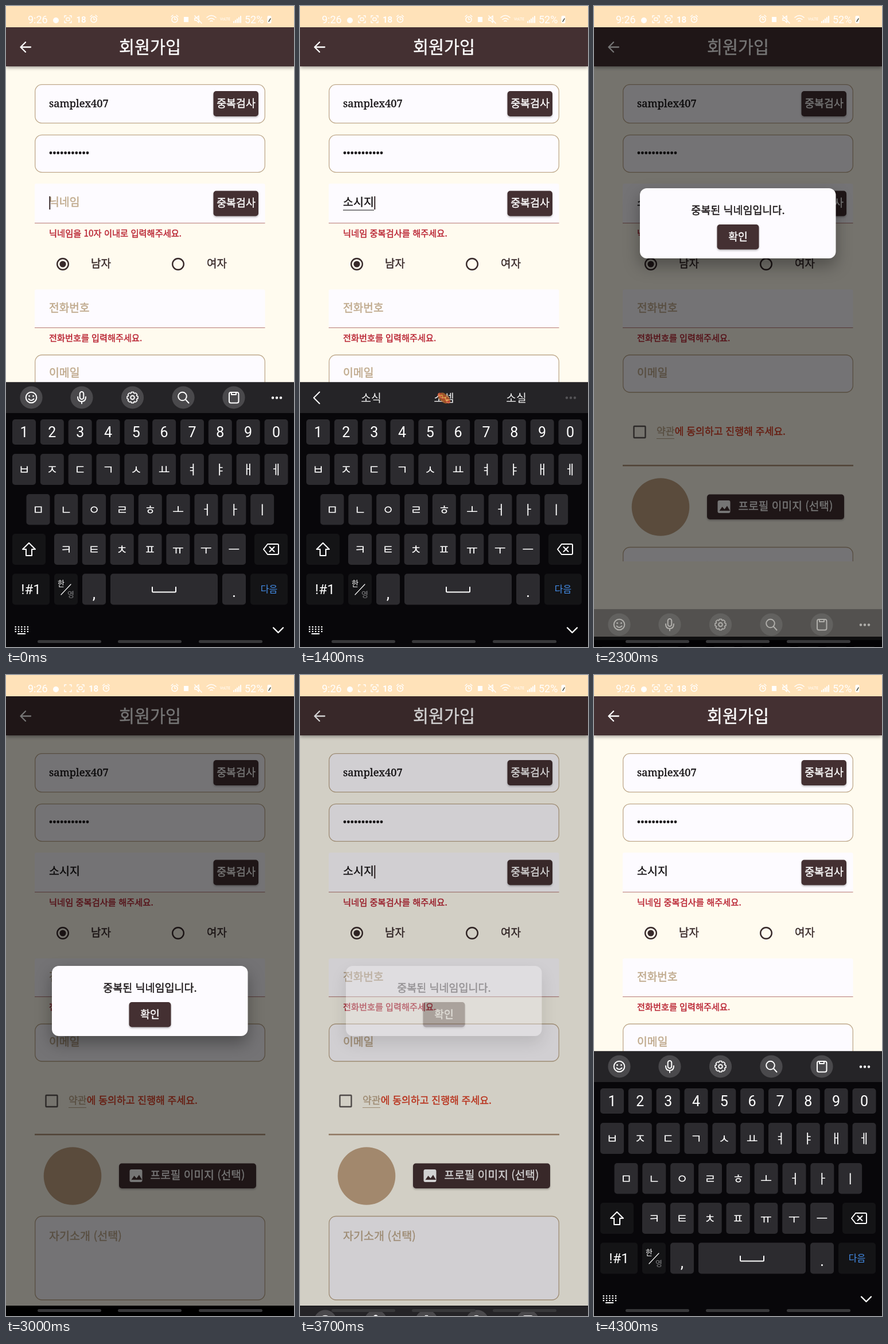
These frames come from a looping animation (502x1115 px, 4600 ms). An HTML page:

```html
<!DOCTYPE html>
<html lang="ko">
<head>
<meta charset="utf-8">
<style>
  html, body { margin: 0; width: 100%; height: 100%; overflow: hidden; background: #000; }
  svg { display: block; width: 502px; height: 1115px; }
  text { font-family: "Noto Sans CJK KR", "Noto Sans CJK", sans-serif; fill: currentColor; white-space: pre; }
  tspan { fill: currentColor; }
  .latin { font-family: Roboto, "Noto Sans CJK KR", sans-serif; }
  .slab { font-family: "Noto Serif", serif; }
  .inked text, .inked tspan { stroke: currentColor; stroke-width: .4; }
  .raised { filter: drop-shadow(0 2px 1.5px rgba(0, 0, 0, .25)); }
  .line { fill: none; stroke: #fff; stroke-width: 2; stroke-linecap: round; stroke-linejoin: round; }
  #dialog { filter: drop-shadow(0 13px 14px rgba(0, 0, 0, .32)); }
</style>
</head>
<body>
<svg id="stage" viewBox="0 0 502 1115"></svg>
<script>
const LOOP = 4600, STEP = 100;
const BROWN = '#443032', INK = '#382a2b', TAN = '#bfa98b', PAPER = '#fdfbff', RED = '#b92231';
const NICK = ['', 'ㅅ', '소', '솟', '소시', '소싲', '소시지'];
const KEY_TIMES = [200, 400, 600, 800, 1000, 1300];
const KEY_NAMES = ['ㅅ', 'ㅗ', 'ㅅ', 'ㅣ', 'ㅈ', 'ㅣ'];

// ---------- drawing helpers ----------
const text = (x, cy, str, size, color, extra = '') =>
  `<text x="${x}" y="${cy + size * .37}" font-size="${size}" color="${color}" ${extra}>${str}</text>`;
const centred = (x, cy, str, size, color, extra = '') =>
  text(x, cy, str, size, color, 'text-anchor="middle" ' + extra);
const rect = (x, y, w, h, fill, r = 0, extra = '') =>
  `<rect x="${x}" y="${y}" width="${w}" height="${h}" rx="${r}" fill="${fill}" ${extra}/>`;
const circle = (x, y, r, fill, extra = '') => `<circle cx="${x}" cy="${y}" r="${r}" fill="${fill}" ${extra}/>`;
const line = (d, style = '') => `<path class="line" d="${d}" style="${style}"/>`;
const repeat = (n, draw) => Array.from({ length: n }, (_, i) => draw(i)).join('');
const group = (id, body, extra = '') => `<g id="${id}" ${extra}>${body}</g>`;

const outlined = (y, h) => rect(50.7, y, 400.6, h, PAPER, 12, `stroke="${TAN}" stroke-width="1.3"`);
const underlined = (y, h) => rect(50, y, 401.5, h, PAPER, 3) + rect(50, y + h - .5, 401.5, 1.2, '#c08a87');
const button = (x, y, w, h) => rect(x, y, w, h, BROWN, 5, 'class="raised"');
const checkButton = y => button(361.5, y, 78.5, 44);
const checkLabel = y => centred(401, y + 21, '중복검사', 18.4, '#fff');
const radio = x => circle(x, 449, 9.8, 'none', `stroke="${INK}" stroke-width="2.4"`);

// ---------- screen parts ----------
function form() {
  return outlined(136.7, 67) + text(75, 169, 'samplex407', 18.3, '#151214', 'class="slab"') +
    checkButton(148) + checkLabel(148) +
    outlined(224.3, 65) + repeat(11, i => circle(78 + i * 6.4, 255.5, 2.4, '#151214')) +
    underlined(309, 68.5) + text(75, 341, '닉네임', 19.4, TAN, 'id="nickHint"') +
    text(75, 341, '', 19.5, '#151214', 'id="nick"') +
    rect(75, 354.5, 54, 1.1, '#222', 0, 'id="composing"') + rect(75, 331, 2, 23, INK, 0, 'id="cursor"') +
    checkButton(321.5) +
    `<g clip-path="url(#checkClip)">${circle(401, 343, 1, '#fff', 'id="ripple"')}</g>` + checkLabel(321.5) +
    text(75, 395, '', 15.3, RED, 'id="error"') +
    radio(99) + circle(99, 449, 5.6, INK) + text(148, 448, '남자', 19, INK) +
    radio(300) + text(350, 448, '여자', 19, INK) +
    underlined(493, 66.5) + text(75, 524.5, '전화번호', 19.2, TAN) +
    text(75, 577, '전화번호를 입력해주세요.', 15.2, RED) +
    outlined(607, 65) + text(75, 638, '이메일', 19.4, TAN) +
    rect(69.5, 731, 20, 20, 'none', 1, 'stroke="#605a58" stroke-width="2.4"') +
    text(109, 740, `<tspan color="${TAN}">약관</tspan>에 동의하고 진행해 주세요.`, 17.2, '#df3b20') +
    rect(109, 752, 31, 1, TAN) + rect(50, 798, 402, 2.6, '#b1957a') +
    circle(116, 871.5, 50.3, '#c4a584') + button(197, 849.5, 239, 43.5) +
    rect(215.5, 860, 22, 22, '#fff', 3) + `<path d="M218.5 878l5-7 4 4.5 4.5-6 5 8.500z" fill="${BROWN}"/>` +
    text(251.5, 870, '프로필 이미지 (선택)', 19.2, '#fff') +
    outlined(941.5, 145.5) + text(75, 976, '자기소개 (선택)', 19.6, TAN);
}

function statusBar() {
  const alarm = x => circle(x, 23.5, 5, 'none', 'stroke="#fff" stroke-width="1.5"') +
    line(`M${x} 20.500v3h2M${x - 6} 18.500l3-2.500M${x + 6} 18.500l-3-2.500`, 'stroke-width:1.3');
  const frame = (x, id) => group(id,
    line(`M${x - 6} 20v-3h3M${x + 3} 17h3v3M${x + 6} 26v3h-3M${x - 3} 29h-3v-3`, 'stroke-width:1.4') +
    rect(x - 3, 20.5, 6, 5, 'none', 1.5, 'stroke="#fff" stroke-width="1.4" class="lens"'));
  return rect(0, 0, 502, 37, '#ffe2b9') +
    text(38, 23, '9:26', 18, '#fff', 'class="latin"') + circle(87, 25, 5, '#fff') +
    frame(108, 'frameA') + frame(130, 'frameB') +
    group('notices', centred(131, 23, '18', 15, '#fff', 'class="latin" font-weight="700"') + alarm(153)) +
    alarm(294) + rect(310, 19, 8, 9, '#fff') +
    line('M329 21h3l4-4v12l-4-4h-3zM329 17l12 13', 'stroke-width:1.5') +
    line('M350 20q8-7 16 0M353 23.500q5-4 10 0M356 26.500q2-1.500 4 0', 'stroke-width:1.6') +
    text(373, 23, 'VoLTE', 6.5, '#fff', 'class="latin"') +
    repeat(5, i => rect(396 + i * 3, 26.5 - i * 2.3, 2, 3 + i * 2.3, '#fff')) +
    text(416, 23, '52%', 18, '#fff', 'class="latin"') +
    rect(455.5, 17, 7, 13, '#fff', 2) + line('M458 27l3-5', 'stroke:#554;stroke-width:1.5');
}

const appBar = () => rect(0, 37, 502, 68, BROWN, 0, 'style="filter:drop-shadow(0 2px 3px rgba(0,0,0,.4))"') +
  line('M43 71.500H26M34 63l-8.500 8.500 8.500 8.500', 'stroke-width:2.3') +
  centred(251, 71, '회원가입', 29.3, '#fff');

// The dialog is drawn around y = 0 and moved as a whole.
const dialog = () => rect(80, -61, 341.5, 122, PAPER, 12) +
  centred(251, -22.5, '중복된 닉네임입니다.', 18.5, '#1c1718') + button(214.5, 2, 73, 43.5) +
  rect(214.5, 2, 73, 43.5, '#fff', 5, 'id="confirmPress"') +
  centred(251, 23, '확인', 18.2, '#fff');

const dots = fill => [465, 472, 479].map(x => circle(x, 681.5, 2.2, fill)).join('');

function tools() {
  const gear = repeat(8, i => {
    const a = i * Math.PI / 4, at = (r, d) => `${220.5 + r * Math.cos(a + d)} ${681 + r * Math.sin(a + d)}`;
    return `${i ? 'L' : 'M'}${at(9.6, -.2)}L${at(9.6, .2)}L${at(7.6, .38)}`;
  }) + 'Z';
  return [44, 132, 220.5, 309, 397].map(x => circle(x, 681, 19.6, '#4a494c')).join('') +
    circle(44, 681, 9.3, 'none', 'class="line"') + circle(40.5, 678.5, 1.4, '#fff') + circle(47.5, 678.5, 1.4, '#fff') +
    line('M39.500 683.500q4.500 5 9 0') +
    rect(128.7, 671, 6.6, 13, 'none', 3.3, 'class="line"') + line('M125 680q0 8 7 8t7-8M132 688v3.500') +
    line(gear, 'stroke-width:1.7') + circle(220.5, 681, 3.3, 'none', 'class="line"') +
    circle(307.5, 679, 7.3, 'none', 'class="line"') + line('M313 684.500l5.500 6') +
    rect(389, 672, 16.5, 18.5, 'none', 3, 'class="line"') + line('M393 672v4h8v-4') + dots('#fff');
}

const words = list => list.map((w, i) => centred([124, 251, 377][i], 681.5, w, 19.3, '#f4f4f4')).join('');
const sausage = () => `<g transform="translate(251 682) rotate(38)">${
  rect(-11, -7, 22, 14, '#b4662c', 7)}${rect(-13, -3.5, 26, 7, '#d8532f', 3.5)}${
  line('M-9 1l3.500-3 3.500 3 3.500-3 3.500 3 3.500-3', 'stroke:#f4c04a;stroke-width:1.6')}</g>`;

function key(x, y, w, h, label, { dark, size = 22, color = '#fff', cls = '' } = {}) {
  return rect(x, y, w, h, dark ? '#141416' : '#2c2b2f', 5, `data-key="${label}"`) +
    centred(x + w / 2, y + h / 2, label, size, color, `class="${cls}"`);
}
const keyRow = (x, y, h, labels, opts) => [...labels].map((c, i) => key(x + i * 48.83, y, 41, h, c, opts)).join('');

function keyboard() {
  return rect(0, 654.5, 502, 461, '#08070a') + rect(0, 654.5, 502, 53.5, '#252427') +
    group('tools', tools()) +
    group('suggestBar', line('M34 671.500l-10 10 10 10') + dots('#555457') +
      group('earlyWords', words(['소개', '소식', '소문'])) + group('lateWords', words(['소식', '소셈', '소실'])) +
      group('finalWord', words(['소시지'])) + group('emoji', sausage())) +
    keyRow(11, 719, 44, '1234567890', { size: 25, cls: 'latin' }) +
    keyRow(11, 779, 54, 'ㅂㅈㄷㄱㅅㅛㅕㅑㅐㅔ') + keyRow(35.5, 849, 53.5, 'ㅁㄴㅇㄹㅎㅗㅓㅏㅣ') +
    keyRow(84, 918, 54, 'ㅋㅌㅊㅍㅠㅜㅡ') +
    key(11, 918, 58, 54, '', { dark: true }) + line('M40 934l-11 11h6v11h10v-11h6z') +
    key(433, 918, 58, 54, '', { dark: true }) +
    line('M456 936h17q2 0 2 2v14q0 2-2 2h-17l-7-9zM459.500 941l8 8M467.500 941l-8 8') +
    key(11, 987.5, 65, 54, '!#1', { dark: true, size: 24, cls: 'latin' }) +
    key(84, 987.5, 41, 54, '', { dark: true }) + centred(96, 1004, '한', 13, '#fff') +
    centred(113, 1023, '영', 13, '#858587') + line('M96 1024l17-18', 'stroke-width:1.2') +
    key(133, 987.5, 41, 54, '') + centred(153.5, 1021, ',', 27, '#fff', 'class="latin"') +
    key(182, 987.5, 187, 54, '') + line('M255 1011v7q0 1.500 1.500 1.500h38q1.500 0 1.500-1.500v-7') +
    key(377, 987.5, 41, 54, '') + centred(397.5, 1018, '.', 27, '#fff', 'class="latin"') +
    key(426, 987.5, 65, 54, '다음', { dark: true, size: 16, color: '#4590ee' }) +
    repeat(15, i => rect(15.5 + i % 5 * 5.3, 1079 + Math.floor(i / 5) * 4, 2.4, 2.2, '#fff')) +
    rect(20, 1091, 14, 2, '#fff') + line('M466 1081.500l8.500 8.500 8.500-8.500', 'stroke-width:2.4');
}

const stage = document.getElementById('stage');
stage.innerHTML = `<defs><clipPath id="bodyClip"><rect id="bodyArea" x="0" y="37" width="502"/></clipPath>
  <clipPath id="checkClip">${rect(361.5, 321.5, 78.5, 44, '#000', 5)}</clipPath></defs>` +
  rect(0, 0, 502, 1097, '#fffbef') + group('form', form(), 'class="inked" clip-path="url(#bodyClip)"') +
  group('appBar', appBar(), 'class="inked"') + rect(0, 37, 502, 1060, '#000', 0, 'id="barrier"') +
  group('dialog', dialog(), 'class="inked"') + statusBar() +
  rect(0, 1097, 502, 18, '#000') + group('keyboard', keyboard()) +
  [55, 195, 336].map(x => rect(x, 1103, 111, 5, '#38383a', 2.5)).join('');

// ---------- animation ----------
const el = id => document.getElementById(id);
const set = (id, attrs) => { for (const name in attrs) el(id).setAttribute(name, attrs[name]); };
const show = (id, opacity) => set(id, { opacity: +opacity });
const between = (t, from, to) => t >= from && t < to;

// Linear interpolation through [time, value] stops.
function track(t, ...stops) {
  const next = stops.findIndex(s => s[0] > t);
  if (next === 0) return stops[0][1];
  if (next < 0) return stops[stops.length - 1][1];
  const [t0, v0] = stops[next - 1], [t1, v1] = stops[next];
  return v0 + (v1 - v0) * (t - t0) / (t1 - t0);
}

function drawTyping(t) {
  const typed = KEY_TIMES.filter(k => t >= k).length;
  const value = NICK[typed];
  el('nick').textContent = value;
  el('error').textContent = typed ? '닉네임 중복검사를 해주세요.' : '닉네임을 10자 이내로 입력해주세요.';
  show('nickHint', !typed);
  show('composing', typed && t < 2200);
  set('composing', { width: value.length * 18 });
  set('cursor', { x: 75.3 + value.length * 18 });
  show('cursor', t < 1900 || between(t, 3700, 4300));

  const pressed = KEY_NAMES[KEY_TIMES.indexOf(t)];
  document.querySelectorAll('[data-key]').forEach(k => {
    if (KEY_NAMES.includes(k.dataset.key))
      k.setAttribute('fill', k.dataset.key === pressed ? '#55545a' : '#2c2b2f');
  });

  const bar = between(t, 200, 2200);
  show('tools', !bar);
  show('suggestBar', bar);
  show('earlyWords', track(t, [700, 1], [900, 0]));
  show('lateWords', track(t, [700, 0], [900, 1], [1400, 1], [1500, 0]));
  show('finalWord', track(t, [1400, 0], [1500, 1]));
  show('emoji', track(t, [1300, 0], [1400, .8], [1500, 1]));
}

function drawDialog(t) {
  const fade = track(t, [2100, 0], [2300, 1], [3600, 1], [3700, .33], [3800, 0]);
  show('barrier', fade * .54);
  show('dialog', fade);
  const y = track(t, [2200, 346], [2300, 378], [2400, 550], [2500, 567]);
  set('dialog', { transform: `translate(0 ${y})` });
  show('confirmPress', track(t, [3400, 0], [3500, .2], [3700, .12]));

  set('ripple', { r: track(t, [2000, 10], [2100, 38], [2200, 50]) });
  show('ripple', track(t, [1900, 0], [2000, .24], [2100, .24], [2300, 0]));
}

function drawKeyboard(t) {
  const drop = track(t, [2200, 0], [2300, 395], [2400, 461], [3600, 461], [3700, 443], [3800, 90], [3900, 6], [4000, 0]);
  set('keyboard', { transform: `translate(0 ${drop})` });
  show('keyboard', track(t, [2200, 1], [2300, .42], [2400, 0], [3600, 0], [3700, 1]));
  const bottom = track(t, [2200, 655], [2300, 966], [2400, 1097], [3700, 1097], [3800, 745], [3900, 655]);
  set('bodyArea', { height: bottom - 37 });
}

function drawStatus(t) {
  const recording = t >= 100;
  show('frameB', recording);
  set('notices', { transform: `translate(${recording ? 21.5 : 0} 0)` });
  stage.querySelector('#frameA .lens').setAttribute('opacity', between(t, 2900, 3900) ? 0 : 1);
}

// The picture is held for each step, like a ten-frames-per-second recording.
function tick() {
  const t = Math.floor(performance.now() % LOOP / STEP) * STEP;
  drawTyping(t);
  drawDialog(t);
  drawKeyboard(t);
  drawStatus(t);
  requestAnimationFrame(tick);
}
tick();
</script>
</body>
</html>
```
